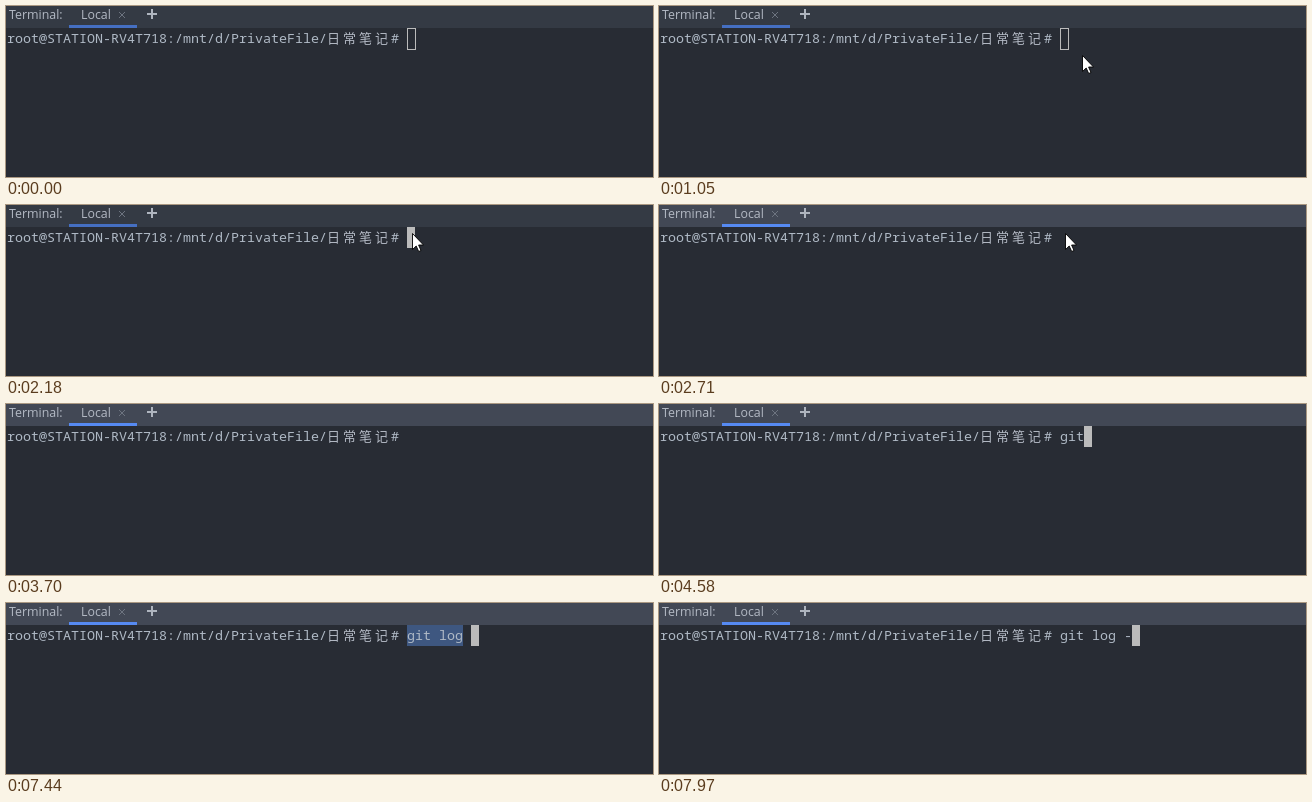
An HTML page for the animation above (8000 ms loop, 647x171 px).

```html
<!DOCTYPE html>
<html lang="en">
<head>
<meta charset="utf-8">
<title>Terminal</title>
<style>
  html, body { margin: 0; width: 100%; height: 100%; overflow: hidden; background: #282c34; }
  svg { display: block; }
  text { white-space: pre; }
  .ui { font: 12.4px "Open Sans", "Noto Sans", sans-serif; fill: #b4bac5; }
  .mono { font: 500 13.333px "Noto Sans Mono", "DejaVu Sans Mono", monospace; fill: #afb9c5; }
  .cjk { font: 13px "Noto Sans CJK SC", "Noto Sans CJK", sans-serif; letter-spacing: 3px; fill: #b4bac5; }
  #bar { fill: #343a44; }
  #line { fill: #456fc2; }
  #caret { fill: none; stroke: #bbb; transform: translate(.5px, .5px); }
  .focus #bar { fill: #424855; }
  .focus #line { fill: #568af2; }
  .active #caret { fill: #bbb; stroke: none; transform: none; }
</style>
</head>
<body>
<svg id="stage" width="647" height="171" viewBox="0 0 647 171">
  <rect width="647" height="171" fill="#282c34"/>
  <rect id="bar" width="647" height="22"/>
  <rect id="line" x="63" y="19" width="68" height="3"/>
  <text class="ui" x="3" y="13">Terminal:</text>
  <text class="ui" x="75" y="13">Local</text>
  <path d="M113 6l6 6m0-6l-6 6" stroke="#6d7480" fill="none"/>
  <path d="M141 8h10M146 3v10" stroke="#afb5bf" stroke-width="2" fill="none"/>

  <rect id="selection" x="401" y="22" width="56" height="21" fill="#3e5780"/>
  <text class="mono" x="1" y="37">root@STATION-RV4T718:/mnt/d/PrivateFile/</text>
  <text class="cjk" x="321" y="37">日常笔记</text>
  <text class="mono" x="385" y="37">#</text>
  <text class="mono" id="typed" x="401" y="37"></text>
  <rect id="caret" y="22" width="8" height="21"/>

  <path id="mouse" d="M.5 .5V16.5L4.2 13L6.7 18.5L9 17.5L6.6 12H11.5Z" fill="#fff" stroke="#000" stroke-width=".9"/>
  <circle id="click" cx="406" cy="28" r="12" fill="#ff0" fill-opacity=".47"/>
</svg>
<script>
  const LOOP = 8000, CELL = 8, PROMPT_END = 401, BLINK = 530;
  const CLICK = 2010, ACTIVE = 2180, FOCUS = 2300;
  const $ = id => document.getElementById(id);

  const command = "git log -";
  const keys = [4390, 4480, 4580, 4810, 5690, 5870, 6100, 6980, 7970];
  // the caret starts a fresh blink on activation, repaints and every key
  const restarts = [ACTIVE, 3170, 6570, ...keys];

  const glides = [
    { start: 520, steps: 3, pace: 60, from: [618, 202], to: [462, 55] },
    { start: 870, steps: 8, pace: 60, from: [462, 55], bend: [411, 59], to: [408, 23] },
    { start: 1470, steps: 5, pace: 60, from: [408, 23], to: [406, 28] },
    { start: 3170, steps: 3, pace: 95, from: [406, 28], to: [553, -19] }
  ];

  const show = (id, on) => $(id).setAttribute("visibility", on ? "visible" : "hidden");

  function pointer(t) {
    const g = glides.findLast(g => g.start <= t);
    if (!g) return null;
    const u = Math.min(1, (Math.floor((t - g.start) / g.pace) + 1) / g.steps);
    return g.from.map((a, i) => {
      const b = g.to[i], c = g.bend ? g.bend[i] : (a + b) / 2;
      return Math.round((1 - u) ** 2 * a + 2 * u * (1 - u) * c + u * u * b);
    });
  }

  function caretOn(t) {
    const since = t - Math.max(...restarts.filter(r => r <= t));
    return t < ACTIVE || Math.floor(since / BLINK) % 2 === 0;
  }

  function draw(t) {
    const count = keys.filter(k => k <= t).length;
    $("typed").textContent = command.slice(0, count);
    $("caret").setAttribute("x", PROMPT_END + count * CELL);
    show("caret", caretOn(t));
    show("selection", count === 7 || count === 8);

    const tip = pointer(t);
    show("mouse", tip);
    if (tip) $("mouse").setAttribute("transform", `translate(${tip})`);
    show("click", t >= CLICK && t < ACTIVE);
    $("stage").classList.toggle("active", t >= ACTIVE);
    $("stage").classList.toggle("focus", t >= FOCUS);
  }

  const start = performance.now();
  function tick() {
    draw((performance.now() - start) % LOOP);
    requestAnimationFrame(tick);
  }
  tick();
</script>
</body>
</html>
```
